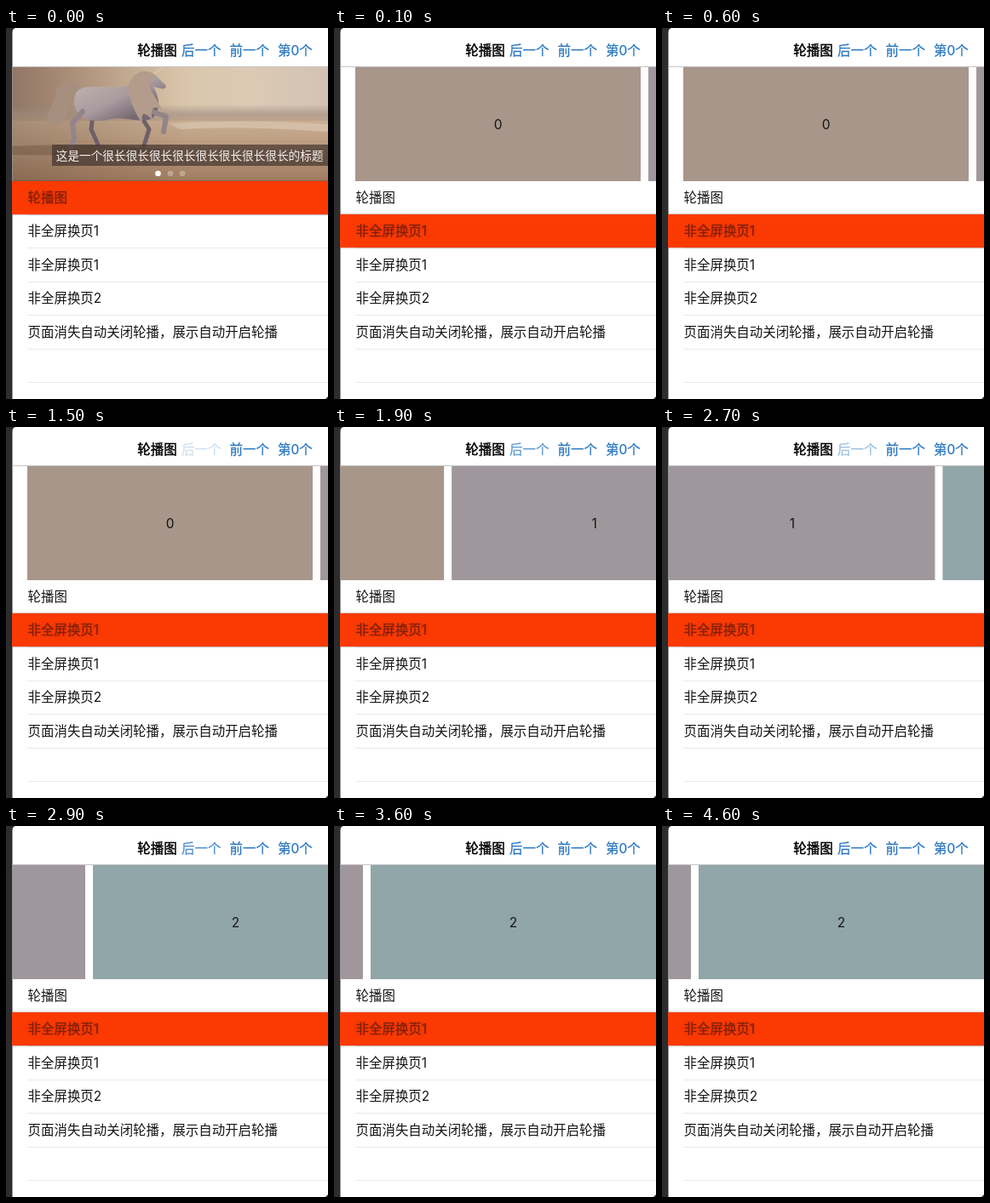
An HTML page with a canvas for the animation above (4.7 s loop, 378x436 px).

```html
<!DOCTYPE html>
<html lang="zh-CN">
<head>
<meta charset="utf-8">
<title>轮播图</title>
<style>
html, body { margin: 0; width: 100%; height: 100%; overflow: hidden; background: #fff; }
canvas { display: block; width: 378px; height: 436px; }
</style>
</head>
<body>
<canvas id="stage"></canvas>
<script>
const W = 378, H = 436, LOOP = 4700;
const LEFT = 7.5, TOP = 46, BOTTOM = 180, ROW = 39.4;
const FONT = 'Inter, "Noto Sans CJK SC", "Noto Sans CJK", sans-serif';
const BLUE = '#2b78c0';
const PAGES = ['#a8968b', '#a0979c', '#91a6a8'];
const PAGE_W = 335, PAGE_GAP = 9;
const ROWS = ['轮播图', '非全屏换页1', '非全屏换页1', '非全屏换页2', '页面消失自动关闭轮播，展示自动开启轮播'];
const PRESSES = [[1500, 1640], [2400, 2590], [3650, 3690], [4160, 4180]];
const SCROLLS = [1625, 2582], SCROLL_MS = 450, FADE_MS = 420;

const canvas = document.getElementById('stage');
const ctx = canvas.getContext('2d');
const ratio = window.devicePixelRatio || 1;
canvas.width = W * ratio;
canvas.height = H * ratio;

const clamp = v => Math.max(0, Math.min(1, v));

// ease-in-out, cubic-bezier(.42, 0, .58, 1)
function ease(x) {
  let lo = 0, hi = 1, u = x;
  for (let i = 0; i < 20; i++) {
    u = (lo + hi) / 2;
    const bx = 1.26 * u * (1 - u) ** 2 + 1.74 * u * u * (1 - u) + u ** 3;
    if (bx < x) lo = u; else hi = u;
  }
  return u * u * (3 - 2 * u);
}

function rect(x, y, w, h, color) {
  ctx.fillStyle = color;
  ctx.fillRect(x, y, w, h);
}

function text(str, x, centerY, { size = 15.45, color = '#151515', stroke = 0, align = 'left' } = {}) {
  ctx.font = `${size}px ${FONT}`;
  ctx.textAlign = align;
  ctx.fillStyle = ctx.strokeStyle = color;
  const y = centerY + size * 0.37;
  ctx.fillText(str, x, y);
  if (stroke) {
    ctx.lineWidth = stroke;
    ctx.strokeText(str, x, y);
  }
}

function shadow(color, blur) {
  ctx.shadowColor = color;
  ctx.shadowBlur = blur * ratio;
}

function gradient(x0, y0, x1, y1, stops) {
  const g = ctx.createLinearGradient(x0, y0, x1, y1);
  stops.forEach((c, i) => g.addColorStop(i / (stops.length - 1), c));
  return g;
}

function shape(d, color) {
  ctx.fillStyle = color;
  ctx.fill(new Path2D(d));
}

function line(d, color, width) {
  ctx.strokeStyle = color;
  ctx.lineWidth = width;
  ctx.lineCap = ctx.lineJoin = 'round';
  ctx.stroke(new Path2D(d));
}

function drawHorse() {
  line('M102 102 L100 119 L108 137 M158 103 L168 119 L162 138', '#6f6068', 5);
  shape('M90 72 C78 58 60 60 59 76 C58 90 47 94 49 113 C60 119 71 110 73 95 C75 82 78 78 88 80Z', '#a78f80');
  shape('M84 74 C94 64 122 73 143 68 C152 54 165 50 175 55 L188 68 Q187 73 181 71 L173 69 C180 82 183 95 172 106 C158 113 143 104 122 107 C104 113 87 106 82 96 C79 88 79 80 84 74Z',
    gradient(110, 62, 135, 112, ['#b9aca9', '#a89ca0', '#776872']));
  line('M90 98 L78 112 L80 130 L76 140 M171 98 L188 104 L185 122', '#93848a', 6);
  shape('M175 55 C161 45 148 54 143 68 C144 82 150 98 160 112 C158 96 164 100 172 108 C168 92 176 90 184 98 C178 84 172 78 168 68Z', '#b39c8c');
  line('M174 54 L184 47', '#d8c7ab', 1.6);
}

function drawBanner() {
  ctx.save();
  ctx.beginPath();
  ctx.rect(LEFT, TOP, W - LEFT, BOTTOM - TOP);
  ctx.clip();
  rect(LEFT, TOP, W, 62, gradient(LEFT, 60, W, 46, ['#ab8f7c', '#c6aa90', '#dac5a9', '#dccab5', '#d3c1b3']));
  rect(LEFT, 90, W, 22, gradient(0, 90, 0, 112, ['rgba(174,156,143,0)', '#b5a090', '#c0a48a']));
  rect(LEFT, 109, W, 71, gradient(0, 109, 0, 180, ['#c9ae92', '#b8977a', '#a07c60']));
  shape('M190 112 Q280 107 378 113 L378 122 Q280 115 205 119Z', '#d4bea7');
  rect(LEFT, TOP, 210, 134, gradient(LEFT, 0, 217, 0, ['rgba(92,68,55,.32)', 'rgba(92,68,55,0)']));
  shape('M7 139 Q100 134 190 143 Q130 151 7 149Z', 'rgba(91,66,51,.35)');
  drawHorse();
  rect(54, 137, W - 54, 25, 'rgba(62,49,43,.68)');
  text('这是一个' + '很长'.repeat(8) + '的标题', 58.8, 150, { size: 13.65, color: '#f4f1ef' });
  [178.5, 193, 207].forEach((x, i) => {
    ctx.fillStyle = i ? 'rgba(220,203,189,.5)' : '#fff';
    ctx.beginPath();
    ctx.arc(x, 171, 3.3, 0, Math.PI * 2);
    ctx.fill();
  });
  ctx.restore();
}

function drawPages(t) {
  const moved = SCROLLS.reduce((sum, s) => sum + ease(clamp((t - s) / SCROLL_MS)), 0);
  ctx.save();
  ctx.beginPath();
  ctx.rect(LEFT, TOP, W - LEFT, BOTTOM - TOP);
  ctx.clip();
  PAGES.forEach((color, i) => {
    const x = 25 + i * (PAGE_W + PAGE_GAP) - moved * PAGE_W;
    rect(x, TOP, PAGE_W, BOTTOM - TOP, color);
    text(String(i), x + PAGE_W / 2, 113, { align: 'center' });
  });
  ctx.restore();
}

function nextAlpha(t) {
  const press = PRESSES.filter(p => t >= p[0]).pop();
  return press ? 0.2 + 0.8 * clamp((t - press[1]) / FADE_MS) : 1;
}

function drawNav(t) {
  const link = { color: BLUE, stroke: 0.25 };
  text('轮播图', 154.3, 26, { stroke: 0.45, color: '#000' });
  ctx.globalAlpha = nextAlpha(t);
  text('后一个', 206, 26, link);
  ctx.globalAlpha = 1;
  text('前一个', 262.5, 26, link);
  text('第0个', 319, 26, link);
  rect(LEFT, 45, W - LEFT, 1, '#c4c4c6');
}

function drawRows(selected) {
  const rowTop = i => Math.floor(BOTTOM + i * ROW);
  for (let i = 1; i <= 6; i++) rect(25, rowTop(i), W - 25, 1, '#e9e9eb');
  shadow('rgba(90,30,15,.7)', 2);
  rect(LEFT - 0.5, rowTop(selected), W, 39, '#fb3a03');
  shadow('transparent', 0);
  ROWS.forEach((label, i) => {
    const on = i === selected;
    if (on) shadow('rgba(100,24,8,.5)', 2);
    text(label, 25.6, 199.3 + i * ROW, { color: on ? '#7c1e0c' : '#151515' });
    shadow('transparent', 0);
  });
}

function draw(t) {
  ctx.setTransform(ratio, 0, 0, ratio, 0, 0);
  rect(0, 0, W, H, '#2d2c2e');
  shape('M7.5 436 V5 Q7.5 1 11 0 H378 V433 L375 436Z', '#fff');
  const home = t < 100;
  if (home) drawBanner(); else drawPages(t);
  drawRows(home ? 0 : 1);
  drawNav(t);
}

const start = performance.now();
function tick() {
  draw((performance.now() - start) % LOOP);
  requestAnimationFrame(tick);
}
tick();
</script>
</body>
</html>
```
